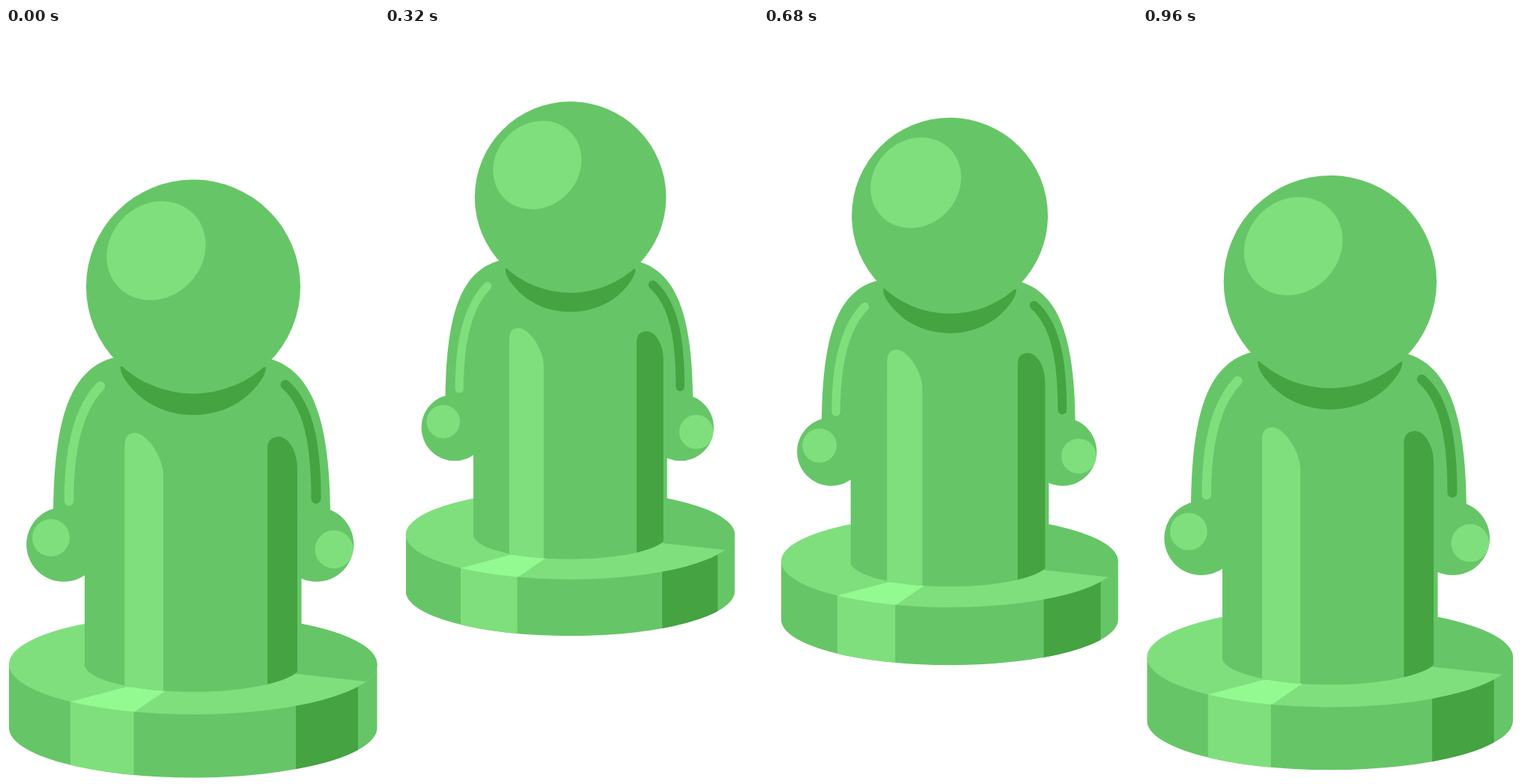
These frames come from a looping animation (498x1002 px, 1000 ms). An HTML page:

```html
<!DOCTYPE html>
<html lang="en">
<head>
<meta charset="utf-8">
<title>Hopping pawn</title>
<style>
  html, body { margin: 0; width: 100%; height: 100%; overflow: hidden; background: #fff; }
  svg { display: block; width: 100%; height: 100%; }
  .main { fill: #66c667; }
  .light { fill: #7fdf7d; }
  .dark { fill: #45a341; }
  .bright { fill: #93f991; }
  .line { fill: none; stroke-linecap: round; }
</style>
</head>
<body>
<svg viewBox="0 0 498 1002">
  <defs>
    <clipPath id="side"><path d="M4 850V935A245.75 66.500 0 0 0 495.500 935V850Z"/></clipPath>
    <clipPath id="disc"><ellipse cx="249.750" cy="850" rx="245.750" ry="67"/></clipPath>
    <clipPath id="torso"><path d="M105 440V852A145 37 0 0 0 394.500 852V440Z"/></clipPath>
  </defs>
  <g id="pawn">
    <!-- base -->
    <g clip-path="url(#side)">
      <path class="main" d="M0 840H498V1002H0Z"/>
      <path class="light" d="M86 840H170.500V1002H86Z"/>
      <path class="dark" d="M387 840H470V1002H387Z"/>
    </g>
    <g clip-path="url(#disc)">
      <path class="light" d="M0 780H498V920H0Z"/>
      <path class="main" d="M380 862L480 873H498V780H380Z"/>
      <path class="bright" d="M84 900.500L160 880.500H220L168 916H84Z"/>
    </g>

    <!-- arms and shoulders -->
    <path class="main" d="M145 440C82 456 64 530 63 650L105 725H394L433 650C432 530 412 460 353 442Z"/>
    <circle class="main" cx="77" cy="690" r="49.750"/>
    <circle class="main" cx="414.500" cy="690" r="49.750"/>
    <circle class="light" cx="60" cy="681" r="25"/>
    <circle class="light" cx="438" cy="696.500" r="25.500"/>

    <!-- torso -->
    <g clip-path="url(#torso)">
      <path class="main" d="M105 700H395V900H105Z"/>
      <path class="light" d="M158.500 900V558C158.500 546 164 541 172 541C188 541 210 573 210 598V900Z"/>
      <path class="dark" d="M349 900V562C349 551 355 546 364 546C377 546 389 565 389 590V900Z"/>
    </g>
    <path class="line" stroke="#7fdf7d" stroke-width="12.500" d="M126 478.500C95 510 84 565 84 632"/>
    <path class="line" stroke="#45a341" stroke-width="13" d="M373 476.500C404 504 414 556 414 629"/>

    <!-- head -->
    <path class="dark" d="M153 452C152 460 158 470 165 478C185 503 216 517 250 517C284 517 315 503 335 478C342 469 347 462 347 453Z"/>
    <circle class="main" cx="250" cy="345.500" r="143"/>
    <ellipse class="light" rx="70" ry="62" transform="translate(200.500 297.500) rotate(-45)"/>
  </g>
</svg>
<script>
  const pawn = document.getElementById('pawn');
  const LOOP = 1000, STEP = 40;

  // [time in ms, lift]
  const keys = [
    [0, 0], [240, .608], [400, 1], [440, 1.125], [520, .956],
    [560, .883], [680, .638], [800, .392], [960, .043], [1000, 0]
  ];

  function liftAt(time) {
    const next = keys.findIndex(([end]) => end > time);
    const [t0, a] = keys[next - 1], [t1, b] = keys[next];
    return a + (b - a) * (time - t0) / (t1 - t0);
  }

  function draw(now) {
    const time = Math.floor(now % LOOP / STEP) * STEP;
    const lift = liftAt(time);
    const scale = 1 - .1325 * lift;
    pawn.setAttribute('transform',
      `translate(${30.1 * lift} ${-102.8 * lift}) scale(${scale})`);
    requestAnimationFrame(draw);
  }

  draw(performance.now());
</script>
</body>
</html>
```
